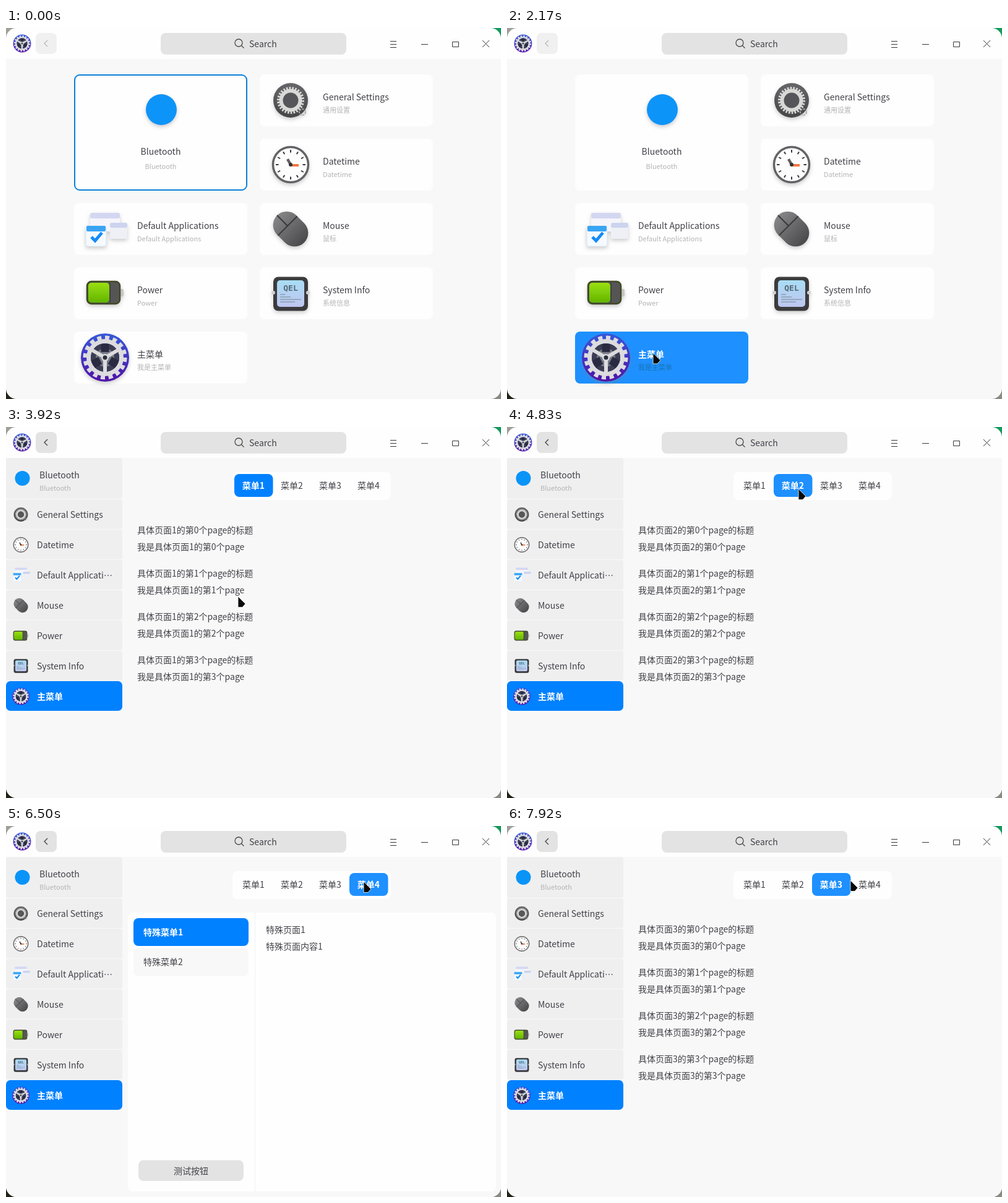
Recreate the animation shown at these times as an HTML page. Size 800 by 600 pixels, loop 8000 ms.

```html
<!DOCTYPE html>
<html lang="zh-CN">
<head>
<meta charset="utf-8">
<title>Settings</title>
<style>
html, body { margin: 0; width: 100%; height: 100%; overflow: hidden; }
svg { display: block; width: 800px; height: 600px; }
text { font: 14px "Noto Sans CJK SC", "Noto Sans CJK", "Noto Sans", sans-serif; fill: #414148; white-space: pre; }
text.sub { font-size: 11px; fill: #b4b4b6; }
text.on { fill: #fff; font-weight: bold; }
</style>
</head>
<body>
<svg id="stage" viewBox="0 0 800 600" xmlns="http://www.w3.org/2000/svg"></svg>
<script>
const BG = '#f8f8f8', CARD = '#fefefe', SIDE = '#efeff0', FIELD = '#e3e3e3', BLUE = '#0081ff', HOVER = '#1e90ff';

const rect = (x, y, w, h, fill, r = 0, more = '') =>
  `<rect x="${x}" y="${y}" width="${w}" height="${h}" rx="${r}" fill="${fill}" ${more}/>`;
const disc = (x, y, r, fill, more = '') => `<circle cx="${x}" cy="${y}" r="${r}" fill="${fill}" ${more}/>`;
const line = (d, color, w = 1, more = '') => `<path d="${d}" fill="none" stroke="${color}" stroke-width="${w}" ${more}/>`;
const text = (x, y, s, cls = '', more = '') => `<text x="${x}" y="${y}" class="${cls}" ${more}>${s}</text>`;
const group = (s, more = '') => `<g ${more}>${s}</g>`;
const put = (s, x, y, k = 1) => group(s, `transform="translate(${x} ${y}) scale(${k})"`);
const range = (n, f) => Array.from({ length: n }, (_, i) => f(i)).join('');
const MID = 'text-anchor="middle"';
const teeth = (r, n, w, color) =>
  disc(0, 0, r, 'none', `stroke="${color}" stroke-width="${w}" pathLength="${2 * n}" stroke-dasharray="1.1 .9"`);
const gradient = (id, a, b) =>
  `<linearGradient id="${id}" x2="0" y2="1"><stop stop-color="${a}"/><stop offset="1" stop-color="${b}"/></linearGradient>`;

// Icons are drawn around their own centre.
const icons = {
  bluetooth: disc(0, 0, 25, '#0a94f8'),
  general: disc(0, 0, 28, 'url(#dark)') + teeth(19.5, 26, 5, '#d8d8d6') +
    disc(0, 0, 15.5, 'none', 'stroke="#d8d8d6" stroke-width="6"') + disc(0, 0, 12, '#57575a') +
    put(disc(0, 0, 5, 'none', 'stroke="#a8a8a8" stroke-width="2" stroke-dasharray="3 1.5"'), 19, 19),
  clock: disc(0, 0, 28.5, '#fdfdfd', 'stroke="#636366" stroke-width="3.5"') +
    range(12, i => line('M0-24v4.5', '#39393b', 2, `transform="rotate(${i * 30})"`)) +
    line('M0 0L-5-9', '#626262', 4.5) + line('M0 1H13', '#f2773c', 4) + disc(0, 0, 3, '#333335'),
  apps: rect(-24, -34, 48, 30, '#f5f5fb', 3) + rect(-24, -34, 48, 9, '#d3d7f1', 3) +
    rect(8, -18, 28, 26, '#eef0f5', 3) + rect(8, -18, 28, 8, '#ccd4f0', 3) +
    rect(-31, -13, 33, 33, '#f4faff', 3, 'stroke="#dbe4ec"') + rect(-30, -13, 31, 9, '#37a4f4', 2) +
    line('M-22 5l6 6 11-13', '#168bf5', 5),
  mouse: group(rect(-22, -31, 44, 62, 'url(#body)', 22) +
    line('M-22-7H22M0-31V-7', '#39393a', 2), 'transform="rotate(-45)"'),
  power: rect(24, -6, 6, 12, '#c6c6c6', 2) + rect(-29, -18, 53, 36, '#555556', 7, 'stroke="#3f4a22" stroke-width="2.5"') +
    rect(-27, -16, 34, 32, 'url(#green)', 5) + line('M8-16V16', '#38383a', 1.5),
  info: rect(-28, -27.5, 56, 55, '#3a3a3c', 8) + rect(-22, -22, 44, 43, 'url(#screen)', 5) +
    disc(-28, -2, 3, '#d0d0d0') + disc(28, -2, 3, '#d0d0d0') +
    text(0, -5, 'QEL', '', `${MID} style="font:bold 13px 'DejaVu Sans Mono',monospace;fill:#526b78"`) +
    line('M-17 1h8M-17 5h17M-17 9h34M-17 13h24', '#8a9fae', 1.5),
  gear: disc(0, 0, 39, 'url(#violet)') + teeth(32, 16, 7, '#dcdcde') +
    disc(0, 0, 26.5, 'none', 'stroke="#dcdcde" stroke-width="7"') + disc(0, 0, 23, '#3a3d52') +
    disc(0, 0, 15, '#777b88') + [0, 120, 240].map(a =>
      line('M0 0V24', '#dcdcde', 6, `transform="rotate(${a})"`) +
      line('M0-22V-9', '#292c40', 13, `transform="rotate(${a})"`)).join('') +
    disc(0, 0, 6, '#dcdcde') + disc(0, 0, 3.5, '#2c2e3e')
};
const shaded = (name, x, y) => group(put(icons[name], x, y), 'filter="url(#shade)"');

// name, caption, second line, column x, row, icon centre y
const entries = [
  ['general', 'General Settings', '通用设置', 410, 0, 117],
  ['clock', 'Datetime', 'Datetime', 410, 1, 221],
  ['apps', 'Default Applications', 'Default Applications', 110, 2, 333],
  ['mouse', 'Mouse', '鼠标', 410, 2, 325],
  ['power', 'Power', 'Power', 110, 3, 428],
  ['info', 'System Info', '系统信息', 410, 3, 430],
  ['gear', '主菜单', '我是主菜单', 110, 4, 533]
];

const card = ([icon, title, sub, x, row, cy]) => {
  const y = 75 + row * 104;
  return rect(x, y, 280, 84, CARD, 8, `id="card-${icon}"`) + shaded(icon, x + 50, cy) +
    text(x + 102, y + 42, title, '', `id="title-${icon}"`) + text(x + 102, y + 62, sub, 'sub', `id="sub-${icon}"`);
};

const home = rect(0, 50, 800, 550, BG) + rect(48, 8, 34, 34, '#f0f0f0', 8) + line('M67 20l-5 5 5 5', '#b8b8b8', 1.3) +
  rect(110, 75, 280, 188, CARD, 8) + rect(111, 76, 278, 186, 'none', 8, 'id="focus" stroke="#0a80d8" stroke-width="2"') +
  shaded('bluetooth', 251, 132) + text(250, 205, 'Bluetooth', '', MID) + text(250, 228, 'Bluetooth', 'sub', MID) +
  entries.map(card).join('');

const sideItem = ([icon, title], i) => {
  const y = 117 + i * 49, on = icon == 'gear';
  const label = title.length > 18 ? 'Default Applicati…' : title;
  return rect(0, y, 188, 48, on ? BLUE : SIDE, on ? 7 : 4) +
    put(icons[icon], 24, y + (icon == 'apps' ? 26.5 : 24.5), on ? .36 : .41) + text(50, y + 30, label, on ? 'on' : '');
};
const sidebar = rect(0, 50, 188, 66, SIDE, 4) + put(icons.bluetooth, 26.5, 83, .48) +
  text(54, 83, 'Bluetooth') + text(54, 103, 'Bluetooth', 'sub') + entries.map(sideItem).join('');

const tabs = n => rect(366, 73, 256, 45, CARD, 8) + rect(307 + 62 * n, 76, 62.5, 37, n == 1 ? BLUE : HOVER, 8) +
  range(4, i => text(400 + 62 * i, 99.500, '菜单' + (i + 1), i + 1 == n ? 'on' : '', MID));
const paragraphs = n => range(4, i =>
  text(212, 172 + 70 * i, `具体页面${n}的第${i}个page的标题`) + text(212, 199 + 70 * i, `我是具体页面${n}的第${i}个page`));
const special = rect(197, 140, 595, 451, CARD, 8) + line('M402.5 140V591', '#f1f1f1') +
  rect(206, 149, 186, 45, BLUE, 8) + text(222, 177, '特殊菜单1', 'on') +
  rect(206, 197, 186, 46, BG, 8) + text(222, 225, '特殊菜单2') +
  text(420, 173, '特殊页面1') + text(420, 200, '特殊页面内容1') +
  rect(214, 540.5, 170, 33.5, FIELD, 8) + text(299, 563, '测试按钮', '', MID);
const page = n => group(rect(189, 50, 611, 550, BG) + tabs(n) + (n == 4 ? special : paragraphs(n)), `id="page${n}"`);

const detail = rect(0, 50, 800, 550, BG) + rect(48, 8, 34, 34, FIELD, 8) +
  line('M67 20l-5 5 5 5', '#414144', 1.3) + sidebar + [1, 2, 4, 3].map(page).join('');

const titleBar = rect(0, 0, 800, 50, CARD) + put(icons.gear, 26, 25, .37) + rect(250, 8, 300, 35, FIELD, 8) +
  disc(376, 24, 6, 'none', 'stroke="#4a4a4c" stroke-width="1.3"') + line('M380.5 28.5l4 4', '#4a4a4c', 1.3) +
  text(393, 31, 'Search') +
  line('M621 21.5h10M621 26.5h10M621 31.5h10M671 26.5h11M721.5 22.5h10v8h-10zM770 20l11 11M781 20l-11 11', '#38383a');

const desktop = rect(0, 0, 400, 300, '#a0a09a') + rect(400, 0, 400, 300, '#159a5c') +
  rect(0, 300, 400, 300, '#232318') + rect(400, 300, 400, 300, '#8a8a84');

stage.innerHTML = `<defs>
  ${gradient('dark', '#66666a', '#464648')}${gradient('body', '#868688', '#4a4a4c')}
  ${gradient('green', '#9ae010', '#62b400')}${gradient('screen', '#a9dcf4', '#bfc6f0')}
  ${gradient('violet', '#3458da', '#5212a8')}
  <clipPath id="window"><rect width="800" height="600" rx="17"/></clipPath>
  <filter id="shade" x="-30%" y="-30%" width="160%" height="160%">
    <feDropShadow dx="0" dy="3" stdDeviation="3" flood-color="#808080" flood-opacity=".4"/></filter>
  </defs>` + desktop +
  group(titleBar + home + group(detail, 'id="detail"'), 'clip-path="url(#window)"') +
  '<path id="cursor" d="M0 0L12 12L7 17.500H0Z" fill="#0a0a0a" stroke="#f8f8f8" stroke-width=".8"/>';

const $ = id => document.getElementById(id);
const path = [ // time, x, y
  [1080, 400, 180], [1500, 237, 495], [1750, 236, 525], [2580, 236, 526],
  [3500, 236, 526], [4250, 471, 100], [5170, 471, 100], [5500, 578, 90], [6500, 578, 90],
  [7000, 513, 102], [7165, 513, 102], [7170, 547, 82], [7330, 547, 82], [7500, 555, 88], [8000, 555, 88]
];
const starts = { detail: 2250, page2: 4330, page4: 5670, page3: 7330 };

function draw(t) {
  const within = (a, b) => t >= a && t < b;
  const show = (id, on) => $(id).setAttribute('visibility', on ? 'visible' : 'hidden');
  for (const id in starts) $(id).style.display = t >= starts[id] ? '' : 'none';

  const pressed = t >= 2000;
  show('focus', !pressed);
  $('card-power').setAttribute('fill', within(1330, 1580) ? '#e6e6e6' : CARD);
  $('card-gear').setAttribute('fill', pressed ? HOVER : within(1580, 2000) ? '#e6e6e6' : CARD);
  $('title-gear').setAttribute('class', pressed ? 'on' : '');
  $('sub-gear').style.fill = pressed ? '#1a74b4' : '';

  const i = path.findIndex(k => k[0] > t);
  show('cursor', i > 0);
  if (i > 0) {
    const [t0, x0, y0] = path[i - 1], [t1, x1, y1] = path[i];
    const p = (t - t0) / (t1 - t0), e = p * p * (3 - 2 * p);
    $('cursor').setAttribute('transform', `translate(${x0 + (x1 - x0) * e} ${y0 + (y1 - y0) * e})`);
  }
}

const begin = performance.now();
function tick() {
  draw((performance.now() - begin) % 8000);
  requestAnimationFrame(tick);
}
tick();
</script>
</body>
</html>
```
